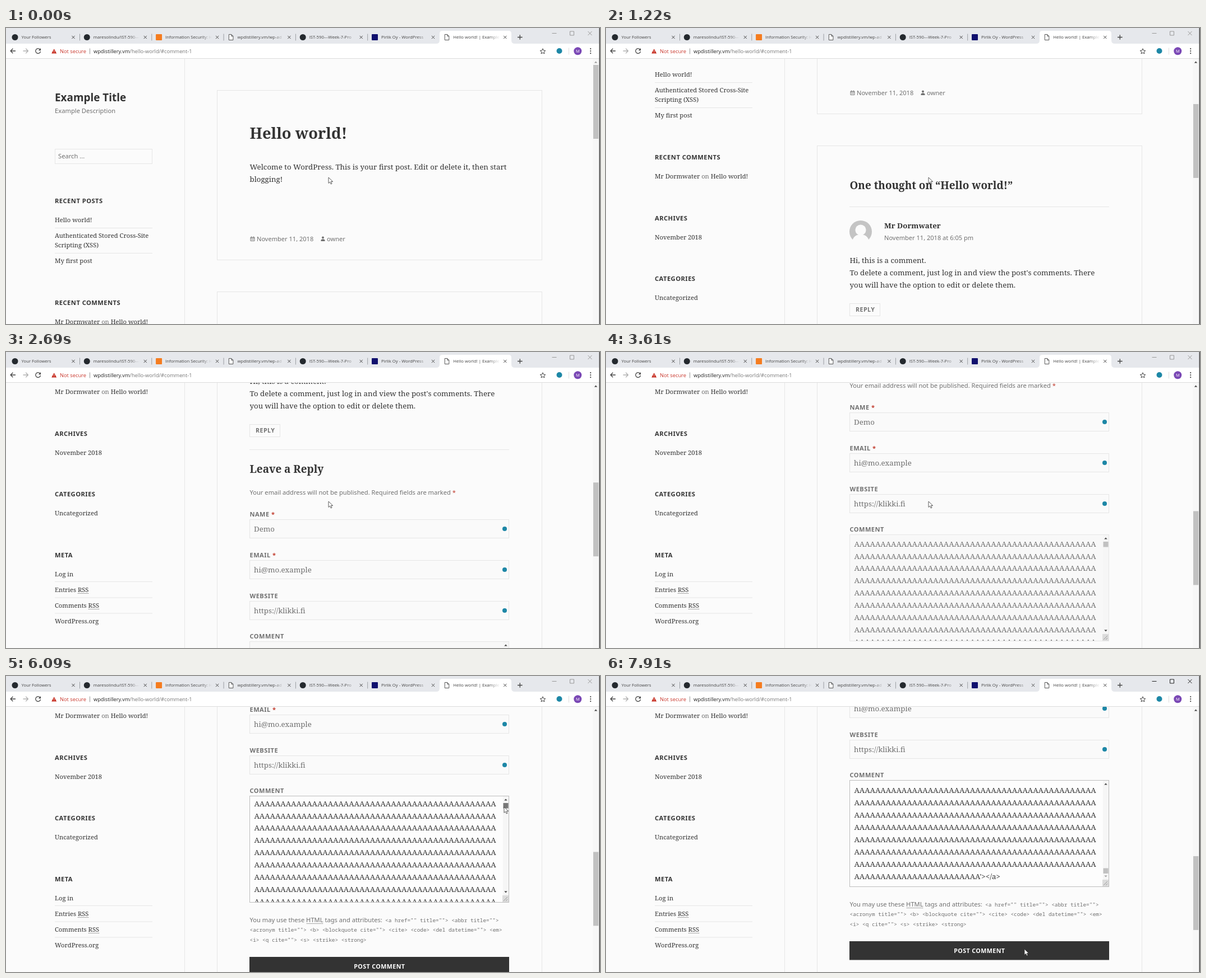
Write an HTML page that moves like this. It is 1059 px wide and 529 px high and loops after 8000 ms.

```html
<!DOCTYPE html>
<html lang="en">
<head>
<meta charset="utf-8">
<title>Blog comment form</title>
<style>
html, body { margin: 0; width: 100%; height: 100%; overflow: hidden; background: #fbfbfb; }
svg { display: block; }
.serif { font-family: "Noto Serif", serif; }
.sans { font-family: "Noto Sans", "Open Sans", sans-serif; }
.ui { font-family: "Open Sans", "Noto Sans", sans-serif; }
.mono { font-family: "Noto Sans Mono", monospace; }
.bold { font-weight: 700; }
.caps { letter-spacing: .04em; }
text { white-space: pre; }
</style>
</head>
<body>
<svg id="stage" width="100%" height="100%" viewBox="0 0 1059 529"></svg>
<script>
const LOOP = 8000, ROW = 21.9, SIDE_MAX = 454;
const INK = '#333', GREY = '#707070', LINE = '#e6e6e6', TEAL = '#1d87a6', STRIP = '#e6e8ec';

// Drawing helpers; text is placed by the vertical middle of its capitals.
const text = (x, mid, str, size, cls = 'serif', fill = INK, extra = '') =>
  `<text x="${x}" y="${(mid + size * .35).toFixed(2)}" font-size="${size}" class="${cls}" fill="${fill}" ${extra}>${str}</text>`;
const rect = (x, y, w, h, fill, extra = '') =>
  `<rect x="${x}" y="${y}" width="${w}" height="${h}" fill="${fill}" ${extra}/>`;
const path = (d, stroke, width = 1, fill = 'none', extra = '') =>
  `<path d="${d}" stroke="${stroke}" stroke-width="${width}" fill="${fill}" ${extra}/>`;
const circle = (x, y, r, fill) => `<circle cx="${x}" cy="${y}" r="${r}" fill="${fill}"/>`;
const rule = (x1, x2, y) => path(`M${x1} ${y}H${x2}`, LINE);
const dots = (x1, x2, y) => path(`M${x1} ${y}H${x2}`, '#555', 1, 'none', 'stroke-dasharray="1 1"');
const frame = (x, y, w, h, fill = 'none') => rect(x, y, w, h, fill, `stroke="${LINE}"`);
const esc = s => s.replace(/</g, '&lt;');
const grey = s => `<tspan fill="${GREY}">${s}</tspan>`;

function sidebar() {
  const head = (y, s) => text(87, y, s, 11.2, 'sans bold caps');
  const item = (y, s) => text(87, y, s, 11.2);
  return text(87, 124, 'Example Title', 18.9, 'sans bold') +
    text(87, 148.5, 'Example Description', 11.2, 'sans', GREY) +
    frame(87.5, 216.5, 173, 26) + text(93, 229.5, 'Search ...', 11.2, 'sans', GREY) +
    head(309, 'RECENT POSTS') + item(343, 'Hello world!') +
    item(371, 'Authenticated Stored Cross-Site') + item(388, 'Scripting (XSS)') +
    item(416, 'My first post') +
    head(491, 'RECENT COMMENTS') + item(525, `Mr Dormwater ${grey('on')} Hello world!`) +
    head(600, 'ARCHIVES') + item(634, 'November 2018') +
    head(708.5, 'CATEGORIES') + item(742, 'Uncategorized') +
    head(817, 'META') + item(851, 'Log in') + item(879, 'Entries RSS') +
    item(907, 'Comments RSS') + item(935, 'WordPress.org') +
    dots(128, 147, 885.5) + dots(147, 166, 913.5) +
    [357.5, 402.5, 864.5, 893, 921].map(y => rule(87, 261, y)).join('');
}

function field(y, label, value, needed) {
  const star = needed ? ' <tspan fill="#c0392b">*</tspan>' : '';
  return text(434.5, y, label + star, 11.1, 'sans bold caps', GREY) +
    frame(434.5, y + 9.5, 462, 33, '#fafafa') +
    text(442, y + 26, value, 13.3, 'serif', GREY) + circle(889, y + 26, 4, TEAL);
}

function commentBox() {
  const lines = Array.from({ length: 10 }, (_, i) =>
    text(7.5, 16 + i * ROW, 'A'.repeat(46), 13.3, 'serif', 'currentColor')).join('');
  return text(434.5, 1132.5, 'COMMENT', 11.1, 'sans bold caps', GREY) +
    rect(434.5, 1141.5, 462, 190, '#f8f8f8', 'id="box"') +
    `<svg x="435" y="1142" width="461" height="189"><g id="rows">${lines}</g></svg>` +
    rect(886, 1142, 10, 177, '#f6f6f6') +
    path('M888.3 1149.5L891 1146.5L893.7 1149.5Z', 'none', 0, '#444') +
    path('M888.3 1311.5L891 1314.5L893.7 1311.5Z', 'none', 0, '#444', 'id="down"') +
    rect(886.5, 1154, 9, 9.5, '#c1c1c1', 'id="thumb"') +
    rect(885, 1319, 11, 12, '#dcdcdc') + path('M887 1329L894 1322M891 1329L894 1326', '#888', .8);
}

function article() {
  const code = (x, y, s) => text(x, y, esc(s), 9.38, 'mono', GREY);
  const meta = (x, y, s) => text(x, y, s, 11.05, 'sans', GREY);
  const body = (y, s) => text(434.5, y, s, 13.3);
  return frame(376.5, 111.5, 579, 303) + frame(376.5, 471.5, 579, 1060) +
    text(434.5, 188, 'Hello world!', 27.4, 'serif bold') +
    body(248.5, 'Welcome to WordPress. This is your first post. Edit or delete it, then start') +
    body(270.5, 'blogging!') +
    path('M436 374H443V380.5H436ZM436 375.5H443M437.5 372.5V374M441.5 372.5V374M437 378H442', GREY, .9) +
    meta(447, 377, 'November 11, 2018') +
    circle(565, 374.6, 2, GREY) + path('M561.5 381V379Q562 377.3 565 377.3Q568 377.3 568.5 379V381Z', 'none', 0, GREY) +
    meta(572, 377, 'owner') +
    text(434.5, 542, 'One thought on “Hello world!”', 18.9, 'serif bold') + rule(434, 897, 580.5) +
    circle(454, 625, 20, '#c4c4c4') + circle(454, 622, 9.6, '#fbfbfb') +
    path('M438 646Q440 630 454 630Q468 630 470 646Z', 'none', 0, '#fbfbfb') +
    text(496, 614, 'Mr Dormwater', 13.3, 'serif bold') + meta(496, 636.5, 'November 11, 2018 at 6:05 pm') +
    body(676.5, 'Hi, this is a comment.') +
    body(698.5, "To delete a comment, just log in and view the post's comments. There") +
    body(720.5, 'you will have the option to edit or delete them.') +
    frame(434.5, 753.5, 54, 22) + text(445, 764.5, 'REPLY', 10.7, 'sans bold caps', GREY) +
    rule(434, 897, 798.5) +
    text(434.5, 833.5, 'Leave a Reply', 18.9, 'serif bold') +
    text(434.5, 875, 'Your email address will not be published. Required fields are marked <tspan fill="#c0392b">*</tspan>', 11.15, 'sans', GREY) +
    field(914, 'NAME', 'Demo', true) + field(987, 'EMAIL', 'hi@mo.example', true) +
    field(1060, 'WEBSITE', 'https://klikki.fi') + commentBox() +
    text(434.5, 1363, 'You may use these HTML tags and attributes:', 11.15, 'sans', GREY) + dots(536, 566, 1369.5) +
    code(676, 1363.5, '<a href="" title=""> <abbr title="">') +
    code(434.5, 1381, '<acronym title=""> <b> <blockquote cite=""> <cite> <code> <del datetime=""> <em>') +
    code(434.5, 1398.5, '<i> <q cite=""> <s> <strike> <strong>') +
    rect(434, 1429, 463, 33.5, INK) +
    text(665.8, 1446, 'POST COMMENT', 10.7, 'sans bold caps', '#fff', 'text-anchor="middle"');
}

function tabs() {
  const list = [
    ['dot', 'Your Followers'], ['dot', 'maresolindu/IST-590---'], ['#f57c1f', 'Information Security: H'],
    ['page', 'wpdistillery.vm/wp-ad'], ['dot', 'IST-590---Week-7-Pro'],
    ['#10106e', 'Pirlik Oy - WordPress'], ['page', 'Hello world! | Example']
  ];
  return list.map(([icon, title], i) => {
    const x = i * 128.3, active = i === 6;
    const mark = icon === 'dot' ? circle(16, 16.5, 5.5, '#24292e')
      : icon === 'page' ? path('M12.5 11.5H17L20 14.5V21.5H12.5ZM17 11.5V14.5H20', '#555', 1, '#fff')
      : rect(10.5, 11, 11, 11, icon, 'rx="1"');
    return `<g transform="translate(${x} 0)">${mark}
      <svg x="27.5" width="83" height="28">${text(0, 16.5, title, 7.75, 'ui', '#444')}
      ${rect(64, 5, 19, 22, `url(#fade${active ? 1 : 0})`)}</svg>
      ${path('M117.4 13.9L122.6 19.1M122.6 13.9L117.4 19.1', '#444')}
      ${i < 5 ? path('M131.5 10.5V22.5', '#9a9da2') : ''}</g>`;
  }).join('');
}

function browser() {
  const fade = (id, color) => `<linearGradient id="fade${id}"><stop stop-color="${color}" stop-opacity="0"/><stop offset="1" stop-color="${color}"/></linearGradient>`;
  return `<defs>${fade(0, STRIP)}${fade(1, '#fff')}</defs>` +
    rect(0, 0, 1059, 28, STRIP) + rect(0, 28, 1059, 26, '#fff') + rect(0, 54, 1059, 1, '#dcdcdc') +
    path('M767 28Q773 28 773 22V10Q773 5 778 5H896Q901 5 901 10V22Q901 28 907 28Z', 'none', 0, '#fff') +
    tabs() + path('M912 16.5H920.6M916.3 12.2V20.8', '#444', 1.3) +
    `<g id="buttons" stroke="#999" fill="none"><path d="M973.5 9.5H981.5M1005.5 6H1012.5V13H1005.5ZM1037.5 6L1044.5 13M1044.5 6L1037.5 13"/></g>` +
    path('M17 41H8.3M12.3 36.8L8.1 41L12.3 45.2', '#444', 1.3) +
    path('M30.5 41H39.2M35.2 36.8L39.4 41L35.2 45.2', '#b0b0b0', 1.3) +
    path('M60.6 38.3A4.4 4.4 0 1 0 61.5 42', '#444', 1.3) + path('M62 36V40.2H57.8Z', 'none', 0, '#444') +
    path('M85.7 37.2L90.2 45.5H81.2Z', 'none', 0, '#c5291c') + path('M85.7 40.2V42.7M85.7 43.4V44.4', '#fff', .9) +
    text(96, 41.5, 'Not secure', 9.3, 'ui', '#c9372c') + path('M149.5 36.5V46.5', '#999') +
    text(156, 41.5, 'wpdistillery.vm<tspan fill="#777">/hello-world/#comment-1</tspan>', 9.26, 'ui', '#222') +
    path('M957 36.8L958.4 40.1L961.8 40.4L959.2 42.7L960 46L957 44.2L954 46L954.8 42.7L952.2 40.4L955.6 40.1Z', '#444') +
    circle(986.5, 41, 5, TEAL) + path('M1003.5 35.5V47.5', '#ddd') + circle(1019.3, 41.3, 7, '#7a48b5') +
    text(1019.3, 41.3, 'M', 7.5, 'ui', '#fff', 'text-anchor="middle"') +
    [37.2, 41.2, 45.2].map(y => circle(1042.2, y, 1.1, '#444')).join('') +
    rect(1046, 55, 11.5, 474, '#f7f7f7') + path('M1048.8 62.6L1051.5 59.6L1054.2 62.6Z', 'none', 0, '#999', 'id="up"') +
    rect(1047, 66, 9.3, 132, '#c1c1c1', 'id="bar"') + rect(1057.5, 0, 1.5, 529, '#4a4a4a');
}

document.getElementById('stage').innerHTML =
  rect(0, 0, 1059, 529, '#fbfbfb') + path('M318.5 55V529', LINE) +
  `<g id="side">${sidebar()}</g><g id="main">${article()}</g>${browser()}` +
  path('M0 0V10.4L2.5 8.2L4.2 12L6 11.2L4.4 7.5H7.7Z', '#333', .8, '#fff', 'id="cursor"');

const [side, main, box, rows, down, thumb, buttons, up, bar, cursor] =
  ['side', 'main', 'box', 'rows', 'down', 'thumb', 'buttons', 'up', 'bar', 'cursor'].map(id => document.getElementById(id));
const lastRow = rows.children[8], spareRow = rows.children[9];

// Each key holds a start time followed by the values that apply from then on.
const pageKeys = [[0, 0], [410, 18], [540, 52], [680, 92], [810, 138], [950, 180], [1080, 222], [1220, 261], [1350, 300],
  [1500, 330], [1640, 380], [1770, 419], [2020, 445], [2160, 485], [2290, 522], [2430, 541],
  [2570, 565], [2690, 624], [2810, 690], [2930, 750], [3050, 773], [3610, 815], [3730, 890], [3850, 927], [7910, 955]];
const boxKeys = [[0, 0], [4260, 5.5], [4400, 90], [4570, 156.3]];
const cursorKeys = [[0, 575, 267], [5120, 585, 250], [5260, 640, 203], [5390, 720, 183], [5530, 800, 196],
  [5670, 868, 222], [5810, 888, 234], [6230, 889, 250], [6370, 892, 290], [6500, 896, 330], [6650, 899, 360],
  [6810, 901, 377], [7370, 850, 408], [7500, 770, 455], [7630, 702, 486], [7910, 746, 488]];
const at = (keys, t) => keys.findLast(k => k[0] <= t).slice(1);
const move = (el, x, y) => el.setAttribute('transform', `translate(${x} ${y})`);

function draw(now) {
  const t = now % LOOP;
  const [scroll] = at(pageKeys, t), [cx, cy] = at(cursorKeys, t);
  const focused = t >= 6090;
  const drag = focused ? Math.min(1, Math.max(0, (cy - 234) / 143)) : 0;
  const ended = drag === 1;
  const inner = ended ? 20.2 : at(boxKeys, t)[0] + drag * 31000;

  move(side, 0, -Math.min(Math.max(0, scroll - 1), SIDE_MAX));
  move(main, 0, -scroll);
  move(bar, 0, scroll * .268);
  move(cursor, cx, cy);
  move(rows, 0, -(inner % ROW));
  move(thumb, 0, drag * 144.5);

  lastRow.textContent = ended ? 'A'.repeat(24) + "'></a>" : 'A'.repeat(46);
  spareRow.setAttribute('visibility', ended ? 'hidden' : 'visible');
  rows.setAttribute('color', focused ? INK : GREY);
  box.setAttribute('fill', focused ? '#fdfdfd' : '#f8f8f8');
  box.setAttribute('stroke', focused ? '#bdbdbd' : LINE);
  thumb.setAttribute('fill', focused && t < 7090 ? '#787878' : '#c1c1c1');
  down.setAttribute('fill', ended ? '#a5a5a5' : '#444');
  up.setAttribute('fill', scroll ? '#444' : '#999');
  buttons.setAttribute('stroke', t >= 6230 ? '#222' : '#999');
  requestAnimationFrame(draw);
}
requestAnimationFrame(draw);
</script>
</body>
</html>
```
